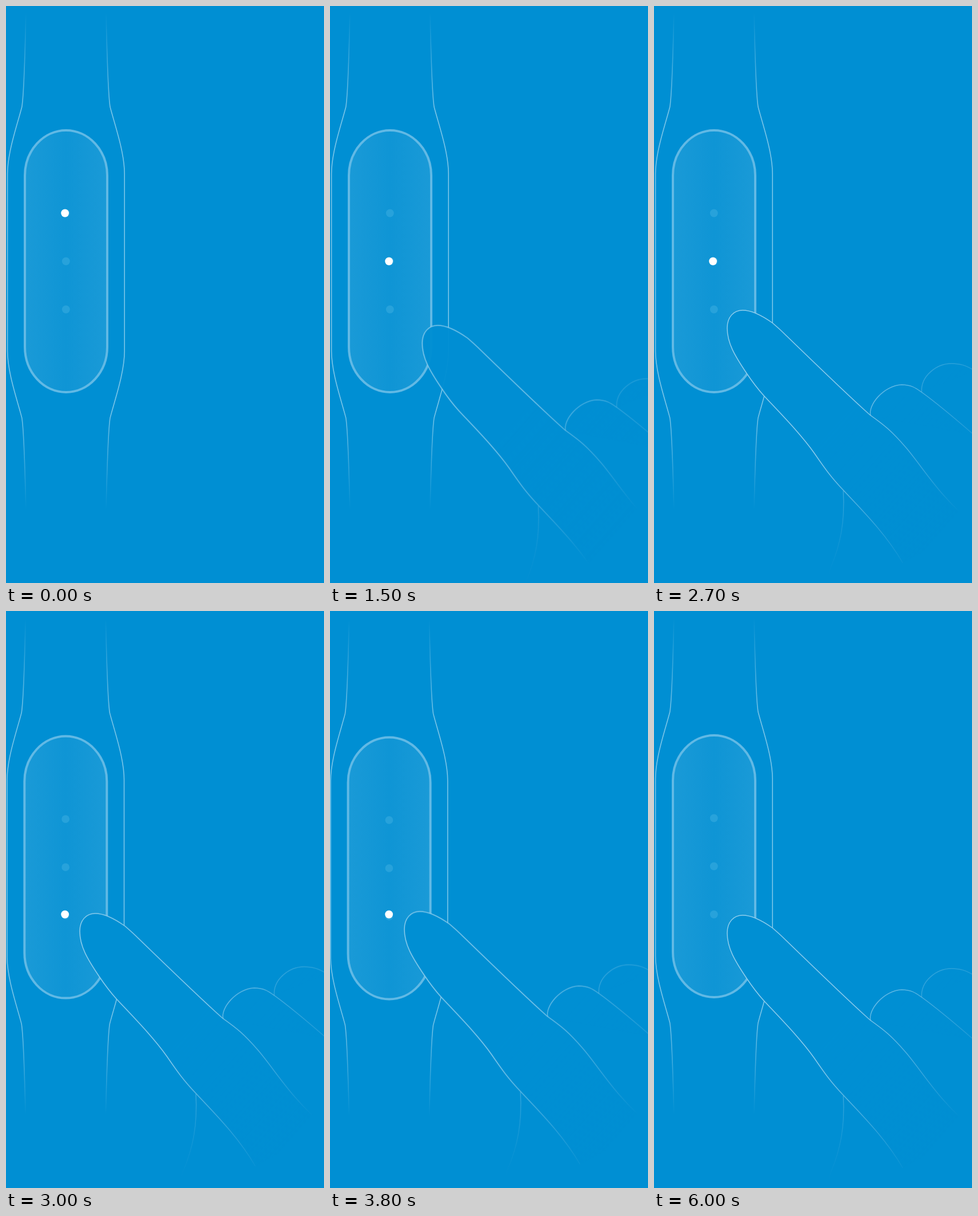
These frames come from a looping animation (556x1007 px, 8000 ms). An HTML page without scripts:

```html
<!DOCTYPE html>
<html lang="en">
<head>
<meta charset="utf-8">
<title>Wristband tap</title>
<style>
  @property --away  { syntax: "<number>"; inherits: true; initial-value: 0; }
  @property --press { syntax: "<number>"; inherits: true; initial-value: 0; }

  html, body { margin: 0; width: 100%; height: 100%; overflow: hidden; background: #008fd3; }
  svg { display: block; width: 100%; height: 100%; animation: press 8s steps(2) infinite; }

  /* --press: 0 at rest, band and finger drift apart as it grows */
  @keyframes press {
    0%, 33.75% { --press: 0; }
    36.25% { --press: .17; }
    38.75% { --press: .585; }
    41.25% { --press: 1; }
    43.75% { --press: 1.17; }
    46.25% { --press: 1; }
    48.75% { --press: .585; }
    51.25% { --press: .17; }
    53.75%, 100% { --press: 0; }
  }
  .band {
    transform: translate(calc(var(--press) * -1.8px), calc(var(--press) * 4.3px));
  }

  /* --away: 1 before the hand slides in, 0 once it has landed */
  .hand {
    animation: enter 8s steps(3) infinite;
    transform: translate(
      calc(var(--away) * 126px + var(--press) * 2.6px),
      calc(var(--away) * 100px - var(--press) * 8.3px));
  }
  @keyframes enter {
    0%, 8.75% { --away: 1; opacity: 0; }
    12.5% { --away: .854; opacity: .5; }
    16.25% { --away: .5; opacity: .9; }
    20% { --away: .146; opacity: 1; }
    23.75%, 100% { --away: 0; opacity: 1; }
  }
  .hand path { fill: #008fd3; stroke: #8fcdec; stroke-width: 1.5; }

  /* running light, then all three lights flash */
  .lights { fill: #fff; }
  .run { animation: run .4s step-end infinite, runOff 8s step-end infinite; }
  @keyframes run {
    0% { transform: none; }
    25%, 75% { transform: translateY(84px); }
    50% { transform: translateY(168px); }
  }
  @keyframes runOff {
    0% { opacity: 1; }
    53.75%, 100% { opacity: 0; }
  }
  .all { animation: flash 8s step-end infinite; }
  @keyframes flash {
    0% { opacity: 0; }
    53.75% { opacity: 1; }
    58.75% { opacity: 0; }
    61.25% { opacity: 1; animation-timing-function: steps(11); }
    75%, 100% { opacity: 0; }
  }
</style>
</head>
<body>
<svg viewBox="0 0 556 1007" preserveAspectRatio="none">
  <defs>
    <linearGradient id="strap" gradientUnits="userSpaceOnUse" x1="0" y1="12" x2="0" y2="878">
      <stop offset="0" stop-color="#fff" stop-opacity="0"/>
      <stop offset=".2" stop-color="#fff" stop-opacity=".48"/>
      <stop offset=".8" stop-color="#fff" stop-opacity=".48"/>
      <stop offset="1" stop-color="#fff" stop-opacity="0"/>
    </linearGradient>
    <linearGradient id="face">
      <stop offset="0" stop-color="#1a9ad7"/>
      <stop offset=".5" stop-color="#0f95d5"/>
      <stop offset="1" stop-color="#1a9ad7"/>
    </linearGradient>
    <linearGradient id="thumb" gradientUnits="userSpaceOnUse" x1="0" y1="840" x2="0" y2="995">
      <stop offset="0" stop-color="#8fcdec" stop-opacity=".6"/>
      <stop offset="1" stop-color="#8fcdec" stop-opacity="0"/>
    </linearGradient>
    <linearGradient id="fade" gradientUnits="userSpaceOnUse" x1="540" y1="475" x2="739" y2="650">
      <stop offset="0" stop-color="#fff"/>
      <stop offset="1" stop-color="#fff" stop-opacity="0"/>
    </linearGradient>
    <mask id="fadeOut" maskUnits="userSpaceOnUse" x="0" y="0" width="556" height="1007" style="mask-type: alpha">
      <rect width="556" height="1007" fill="url(#fade)"/>
    </mask>
    <path id="edge" d="M175 12C176 60 178 150 182 176C190 207 207.2 255 207.2 293V602
      C207.2 640 190 688 182 719C178 745 176 835 175 878" fill="none" stroke="url(#strap)" stroke-width="1.6"/>
    <circle id="dot" r="6.9"/>
  </defs>

  <g class="band">
    <use href="#edge"/>
    <use href="#edge" transform="translate(209.8) scale(-1 1)"/>
    <rect x="33" y="217" width="144" height="457" rx="72" ry="79" fill="url(#face)" stroke="#61b9e5" stroke-width="4"/>
    <g fill="#27a2db">
      <use href="#dot" x="104.8" y="361.5"/>
      <use href="#dot" x="104.8" y="445.5"/>
      <use href="#dot" x="104.8" y="529.5"/>
    </g>
  </g>

  <g class="lights">
    <g class="run"><use href="#dot" x="103.1" y="361.5"/></g>
    <g class="all">
      <use href="#dot" x="103.1" y="361.5"/>
      <use href="#dot" x="103.1" y="445.5"/>
      <use href="#dot" x="103.1" y="529.5"/>
    </g>
  </g>

  <g mask="url(#fadeOut)">
    <g class="hand">
      <path d="M468 674C466 645 495 624 520 624C535 624 545 627 560 636" stroke-opacity=".45"/>
      <path d="M379 715C373 697 402 662 433 661C450 661 458 667 468 674C500 697 530 723 560 749" stroke-opacity=".75"/>
      <path d="M331 846C334 900 326 940 309 980L305 993" style="fill: none; stroke: url(#thumb)"/>
      <path d="M560 905C500 858 468 802 440 770C415 741 402 731 378 714C345 685 290 632 230 574
        C222 566 214 559 207 553C190 541 172 531 155 531C139 531 128 543 128 562
        C128 588 141 610 162 641C172 656 183 670 192 680C220 710 255 745 280 780
        C300 809 310 823 332 846C360 876 405 920 435 972"/>
    </g>
  </g>
</svg>
</body>
</html>
```
